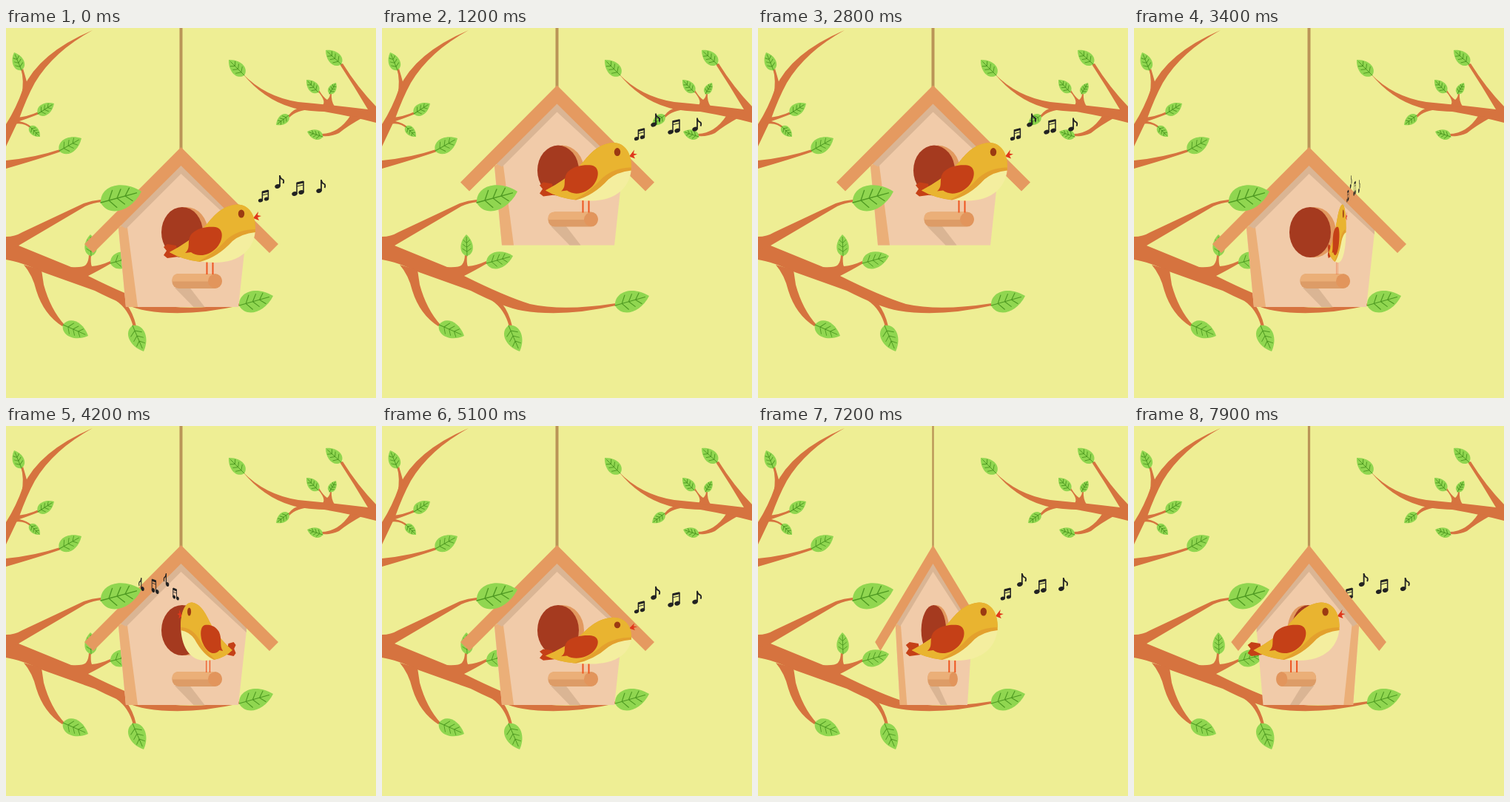
Recreate the animation shown at these times as an HTML page. Size 500 by 500 pixels, loop 8 s.

```html
<!DOCTYPE html>
<html lang="en">
<head>
<meta charset="utf-8">
<title>Singing bird</title>
<style>
html, body { margin: 0; width: 100%; height: 100%; overflow: hidden; background: #eeee94; }
svg { display: block; width: 100vw; height: 100vh; }
.wood { fill: #d6733f; }
.leaf path { fill: #90d650; }
.leaf .vein { fill: none; stroke: #4f9a22; stroke-linecap: round; }
.note { fill: #222; }
.note path { fill: none; stroke: #222; }
</style>
</head>
<body>
<svg viewBox="0 0 500 500">
  <rect width="500" height="500" fill="#eeee94"/>
  <g class="wood">
    <path d="M117 3Q64 32 39 74Q28 94 18 122L0 160V130Q14 108 23 82Q44 34 117 3Z"/>
    <path d="M20 55L23 55Q26 65 29 76L21 92Q25 70 20 55Z"/>
    <path d="M12 121Q30 120 44 113L45 116Q30 122 18 126Q28 128 35 134L33 136Q25 127 10 130Z"/>
    <path d="M0 179Q40 175 73 164L74 167Q45 177 0 190Z"/>
    <path d="M320 62Q350 93 395 100Q440 104 489 110Q470 78 451 49L455 48Q475 80 500 106V128Q470 120 430 113Q400 112 385 107Q348 96 320 62Z"/>
    <path d="M381 119Q388 109 402 106L413 110Q392 111 383 121Z"/>
    <path d="M427 143Q450 142 465 119L484 120Q462 132 450 142Q440 147 427 146Z"/>
    <path d="M421 85L423 84Q429 94 434 97Q438 94 438 88L440 88Q439 98 444 106L427 105Q434 100 421 85Z"/>
    <path d="M0 288L17 294L88 323Q104 324 108 320Q112 315 112 306L115 306Q114 318 116 322Q128 321 141 315L142 318Q125 328 111 335Q165 362 200 373Q245 383 316 372V375Q245 391 190 382Q165 378 120 355L50 330Q20 316 0 313Z"/>
    <path d="M24 320Q36 334 41 355Q51 387 76 403L79 401Q60 380 51 347L48 327Z"/>
    <path d="M148 368Q166 380 172 404L176 403Q172 385 162 372Z"/>
  </g>
  <g id="leaves" class="leaf"></g>
  <g id="backNotes"></g>
  <g id="house">
    <rect x="-2" y="-300" width="4" height="466" fill="#ba9457"/>
    <path d="M0 180L88.5 271V276L77.5 377H-74.5L-84.5 272Z" fill="#f1cba9"/>
    <path d="M-84.5 270L-73.5 262L-58.5 377H-74.5Z" fill="#ebaf78"/>
    <path d="M0 184L88.5 272V279L0 197L-74 271L-82 267Z" fill="#dab594"/>
    <path d="M0 161L131.5 292L119.5 304L0 186L-118.5 304L-130.5 292Z" fill="#e59a60"/>
    <ellipse cx="7" cy="276" rx="29.5" ry="34" fill="#e2995f"/>
    <ellipse cx="1.5" cy="276" rx="28" ry="34" fill="#a53a1f"/>
    <path d="M-8.500 351H12L32 377H17Z" fill="#dab594"/>
    <rect x="-12" y="332" width="67" height="20" rx="9" fill="#dd9c67"/>
    <path d="M-12 342.500V341Q-12 332 -3 332H46V342.500Z" fill="#ebaf78"/>
    <circle cx="46" cy="342" r="9.500" fill="#e2955c"/>
  </g>
  <g id="frontBranch">
    <path class="wood" d="M0 282Q12 282 22 276L105 237Q116 233 128 232L130 235Q118 236 107 241L17 294L0 300Z"/>
    <g id="frontLeaf" class="leaf"></g>
  </g>
  <g id="bird">
    <path d="M271.500 315V333M279.500 315V333" stroke="#ee551f" stroke-width="2"/>
    <path d="M230 294L218 292L213 296L217 301L213 307L218 311L233 309Z" fill="#c54017"/>
    <path d="M334 257L341 248L340 253L345 254L340 256L342 260Z" fill="#e0381c"/>
    <path d="M337 270C337 297 318 317 282 317Q270 317 260 315L290 280Z" fill="#f4ee9f"/>
    <path d="M221 303Q248 289 266 271C276 261 288 240 312 238.500C328 238 338 253 337 276Q318 278 306 288Q286 310 262 316Q238 313 221 303Z" fill="#e3a02d"/>
    <path d="M221 303Q248 289 266 271C276 261 288 240 312 238.500C328 238 338 253 337 272Q314 272 298 286Q282 304 260 315.500Q238 313 221 303Z" fill="#e9b430"/>
    <path d="M242 304C251 297 243 288 251 278C259 270 272 268 283 269C294 271 294 284 287 294C278 307 260 311 250 303Z" fill="#c54017"/>
    <ellipse cx="318" cy="251" rx="4.200" ry="5.500" fill="#9c3a12"/>
  </g>
  <g id="frontNotes">
    <g id="notes" class="note"></g>
  </g>
</svg>
<script>
const $ = id => document.getElementById(id);
const CX = 236.5;      // axis of the house
const BIRD_X = 274;    // axis of the sideways flip
const BIRD_Y = 340;    // axis of the upside-down flip
const LIFT = 417;

// Leaf from stem (x1,y1) to tip (x2,y2); w is its fullness.
function leaf(x1, y1, x2, y2, w = 0.38) {
  const len = Math.hypot(x2 - x1, y2 - y1);
  const angle = Math.atan2(y2 - y1, x2 - x1) * 180 / Math.PI;
  let veins = 'M0 0L.88 0';
  for (const x of [0.2, 0.4, 0.6]) {
    const h = w * (0.62 - x * 0.35);
    veins += `M${x} 0L${x + 0.14} ${-h}M${x} 0L${x + 0.14} ${h}`;
  }
  return `<g transform="translate(${x1} ${y1}) rotate(${angle}) scale(${len})">
    <path d="M0 0C.08 ${-w} .62 ${-w * 1.1} 1 0C.62 ${w * 1.1} .08 ${w} 0 0Z"/>
    <path class="vein" d="${veins}" stroke-width="${Math.max(0.9, len * 0.024) / len}"/></g>`;
}

const head = (x, y, r) =>
  `<ellipse cx="${x}" cy="${y}" rx="${r}" ry="${r * 0.75}" transform="rotate(-20 ${x} ${y})"/>`;

function quaver(x, y) {
  return head(x, y, 3.8) +
    `<path d="M${x + 3} ${y}V${y - 15}" stroke-width="1.8"/>
     <path d="M${x + 3} ${y - 14}Q${x + 4} ${y - 10} ${x + 7.5} ${y - 9}Q${x + 9} ${y - 7} ${x + 7.5} ${y - 4}" stroke-width="1.8"/>`;
}

function beamed(x, y, gap, h, r) {
  const a = x + r - 0.8, b = a + gap, top = y - h;
  return head(x, y, r) + head(x + gap, y - 2, r) +
    `<path d="M${a} ${y}V${top}M${b} ${y - 2}V${top - 2}" stroke-width="1.5"/>
     <path d="M${a} ${top + 1}L${b} ${top - 1}" stroke-width="3"/>
     <path d="M${a} ${top + 5}L${b} ${top + 3}" stroke-width="1"/>`;
}

$('leaves').innerHTML = [
  [21, 57, 11, 33], [43, 116, 65, 102], [32, 133, 46, 147], [72, 166, 102, 149],
  [322, 64, 301, 43], [422, 87, 406, 70], [437, 89, 446, 74], [382, 118, 365, 131],
  [428, 147, 407, 140], [453, 49, 432, 30], [115, 308, 114, 279, 0.36],
  [141, 318, 177, 308], [77, 401, 111, 416], [171, 402, 186, 437], [315, 375, 361, 362]
].map(a => leaf(...a)).join('');
$('frontLeaf').innerHTML = leaf(128, 236, 183, 221);
$('notes').innerHTML =
  beamed(344, 233, 8, 12, 3.2) + quaver(367, 214) +
  beamed(390, 224, 9, 15, 3.8) + quaver(423, 220);

// Linear there and back: 0 to 1 to 0 within two seconds.
const swing = (t, start) => Math.max(0, 1 - Math.abs((t - start) / 1000 - 1));
const move = (el, value) => el.setAttribute('transform', value);

function draw(time) {
  const t = Math.floor(time % 8000 / 100) * 100;
  const lift = -LIFT * swing(t, 1000);
  const flipX = 1 - 2 * swing(t, 3000);
  const flipY = 1 - 2 * swing(t, 5000);
  const turn = 1 - 2 * swing(t, 7000);
  const shift = `translate(${33 * (turn - 1)} ${lift})`;
  const mirror = `translate(${BIRD_X} 0) scale(${flipX} 1) translate(${-BIRD_X} 0)`;

  move($('house'), `translate(${CX} ${lift}) scale(${turn} 1)`);
  move($('bird'), `${shift} ${mirror} translate(0 ${BIRD_Y}) scale(1 ${flipY}) translate(0 ${-BIRD_Y})`);
  move($('notes'), `${shift} ${mirror} translate(0 ${88.5 * (1 - flipY)})`);

  // The notes pass behind the house once it has turned around.
  const layer = $(turn < 0 ? 'backNotes' : 'frontNotes');
  if ($('notes').parentNode !== layer) layer.appendChild($('notes'));
}

const begin = performance.now();
function tick() {
  draw(performance.now() - begin);
  requestAnimationFrame(tick);
}
tick();
</script>
</body>
</html>
```
